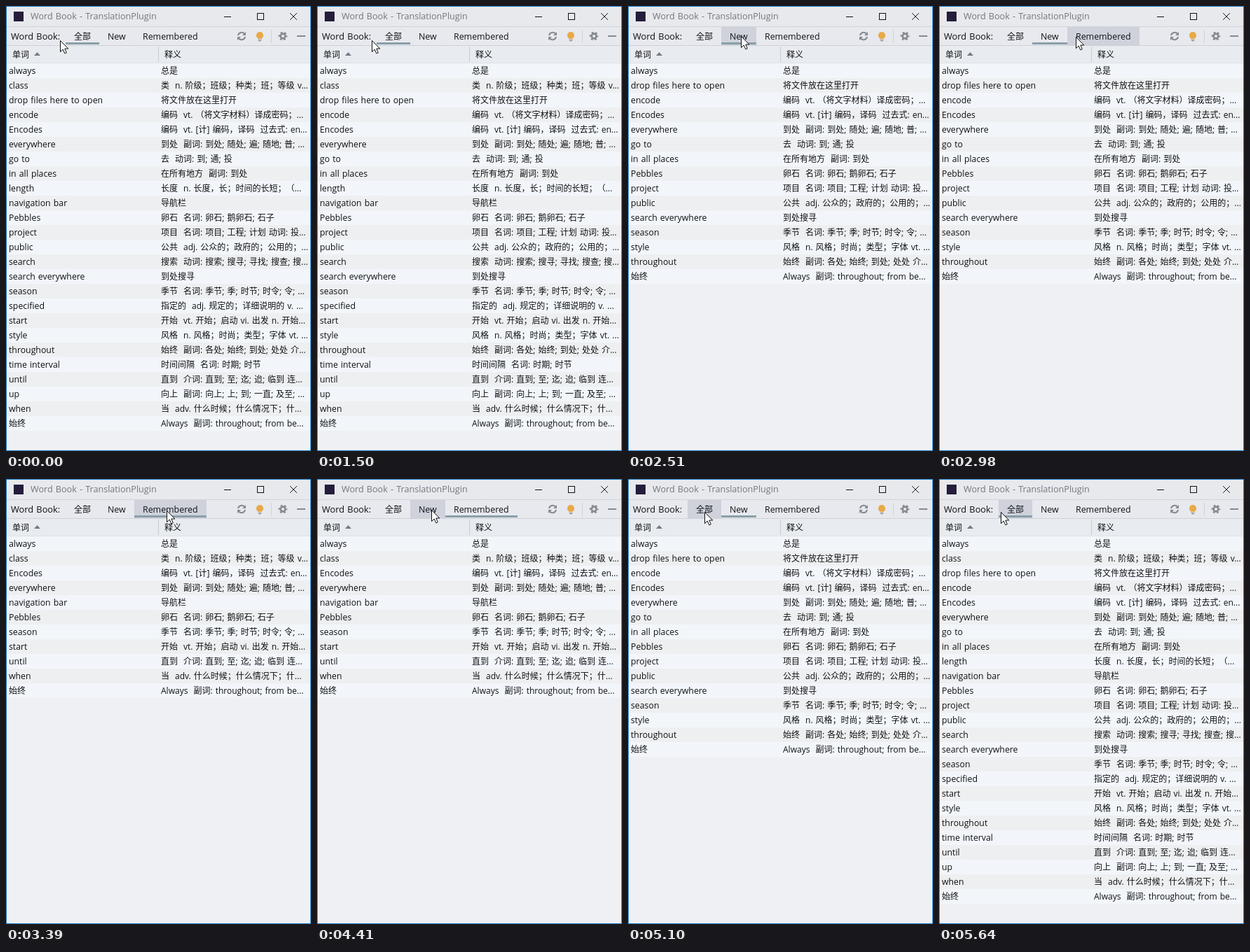
Write an HTML page that moves like this. It is 435 by 636 pixels and loops after 5710 ms.

```html
<!DOCTYPE html>
<html lang="zh-CN">
<head>
<meta charset="utf-8">
<title>Word Book</title>
<style>
html, body { margin: 0; width: 100%; height: 100%; overflow: hidden; }
body {
  position: relative; background: #eef0f3; color: #101114;
  font: 12px "Open Sans", "Noto Sans CJK SC", "Noto Sans CJK JP", sans-serif;
  word-spacing: .9px; white-space: pre; text-spacing-trim: space-all; cursor: default;
}
.bar, .bar span, .tab, #list, #list b, #list i, #frame, svg { position: absolute; }
.bar { left: 0; width: 435px; }
#title { top: 0; height: 29px; line-height: 30px; background: #e7e9ed; border-bottom: 1px solid #d0d3d8; }
#title span { left: 35px; font-size: 12.6px; color: #74777c; }
#tools { top: 30px; height: 26px; line-height: 27px; background: #e7e9ee; border-bottom: 1px solid #cdd1d6; }
#tools > span { left: 7px; font-size: 12.8px; }
.tab { top: 0; height: 26px; text-indent: 12px; font-size: 12.4px; }
.tab:first-of-type { font-size: 12px; }
.tab.hover { background: #cfd2db; }
.tab.on::after {
  content: ""; position: absolute; left: 0; right: 0; bottom: 1px; height: 3px; background: #8a9faa;
}
#head { top: 57px; height: 24px; line-height: 25px; background: #e8ebef; border-bottom: 1px solid #dfe2e6; }
#list { top: 82px; left: 0; width: 435px; }
#list div { position: relative; height: 21px; line-height: 21px; background: #eeeff1; }
#list div:nth-child(odd) { background: #f2f6fa; }
#list b { left: 4px; font-weight: 400; font-size: 12.3px; }
#list b.cjk { font-size: 12px; }
#list i { left: 221px; font-style: normal; }
svg { left: 0; top: 0; }
#frame { inset: 0; border: 1px solid #1878c4; }
</style>
</head>
<body>
<div class="bar" id="title"><span>Word Book - TranslationPlugin</span></div>
<div class="bar" id="tools"><span>Word Book:</span><div class="tab" style="left:85px;width:48px">全部</div><div class="tab" style="left:133px;width:50px">New</div><div class="tab" style="left:183px;width:103px">Remembered</div></div>
<div class="bar" id="head"><span style="left:9px">单词</span><span style="left:226px">释义</span></div>
<div id="list"></div>
<svg width="435" height="636" fill="none">
  <rect x="11" y="8" width="14" height="14" fill="#251d3b"/>
  <g stroke="#111" stroke-linecap="square">
    <path d="M311.500 15.500H320.500"/>
    <rect x="358.500" y="10.500" width="9" height="9"/>
    <path d="M405.500 10.500L414.500 19.500M414.500 10.500L405.500 19.500"/>
  </g>
  <path d="M44.500 66L49 71H40Z" fill="#7a7886"/>
  <path d="M217.500 58V80" stroke="#c9cdd2"/>
  <path d="M378.500 34V53" stroke="#cfd2d7"/>
  <g stroke="#858a90" stroke-width="2">
    <path d="M331 42A5.200 5.200 0 0 1 340 39.500M341 44A5.200 5.200 0 0 1 332 46.500"/>
    <path d="M415 43H427"/>
    <circle cx="395" cy="43" r="3.400" stroke-width="2.600"/>
    <circle cx="395" cy="43" r="5.400" stroke-dasharray="2.827 2.827" stroke-dashoffset="1.414"/>
  </g>
  <path d="M342 37V42H337ZM330 49V44H335Z" fill="#858a90"/>
  <path d="M362 37A5 5 0 0 1 365 46V47H359V46A5 5 0 0 1 362 37Z" fill="#e9a947"/>
  <path d="M359.500 48.500H364.500M360.500 50H363.500" stroke="#8b8577"/>
  <path id="mouse" d="M.5 .5V16.500L4.200 13L6.800 18.800L9.300 17.700L6.800 12H11.800Z" fill="#fff" stroke="#111"/>
</svg>
<div id="frame"></div>
<script>
// word | meaning | lists it belongs to (n: new, r: remembered)
const words = `always|总是|nr
class|类  n. 阶级；班级；种类；班；等级 v...|r
drop files here to open|将文件放在这里打开|n
encode|编码  vt. （将文字材料）译成密码；...|n
Encodes|编码  vt. [计] 编码，译码  过去式: en...|nr
everywhere|到处  副词: 到处; 随处; 遍; 随地; 普; ...|nr
go to|去  动词: 到; 通; 投|n
in all places|在所有地方  副词: 到处|n
length|长度  n. 长度，长；时间的长短；（...|
navigation bar|导航栏|r
Pebbles|卵石  名词: 卵石; 鹅卵石; 石子|nr
project|项目  名词: 项目; 工程; 计划 动词: 投...|n
public|公共  adj. 公众的；政府的；公用的；...|n
search|搜索  动词: 搜索; 搜寻; 寻找; 搜查; 搜...|
search everywhere|到处搜寻|n
season|季节  名词: 季节; 季; 时节; 时令; 令; ...|nr
specified|指定的  adj. 规定的；详细说明的 v. ...|
start|开始  vt. 开始；启动 vi. 出发 n. 开始...|r
style|风格  n. 风格；时尚；类型；字体 vt. ...|n
throughout|始终  副词: 各处; 始终; 到处; 处处 介...|n
time interval|时间间隔  名词: 时期; 时节|
until|直到  介词: 直到; 至; 迄; 迨; 临到 连...|r
up|向上  副词: 向上; 上; 到; 一直; 及至; ...|
when|当  adv. 什么时候；什么情况下；什...|r
始终|Always  副词: throughout; from be...|nr`.split("\n").map(line => line.split("|"));

const LOOP = 5710, STEP = 70;
const filters = ["", "n", "r"];
const edges = [85, 133, 183, 286];
const clicks = [[0, 0], [2510, 1], [3390, 2], [4480, 1], [5230, 0]];
// start time, steps, end point, easing power
const moves = [
  [1500, 5, 110, 51, 2],
  [2040, 4, 161, 43, 1],
  [2770, 8, 229, 45, 1],
  [3920, 8, 163, 44, 1],
  [4680, 7, 109, 47, 1],
  [5430, 4, 88, 47, 1]
];

const list = document.getElementById("list");
const mouse = document.getElementById("mouse");
const tabs = document.querySelectorAll(".tab");
let shown = -1;

function mouseAt(t) {
  let x = 77, y = 49;
  for (const [start, steps, toX, toY, power] of moves) {
    if (t < start) break;
    const done = Math.min(steps, Math.floor((t - start) / STEP) + 1);
    const k = (done / steps) ** power;
    x += (toX - x) * k;
    y += (toY - y) * k;
  }
  return [Math.round(x), Math.round(y)];
}

function showList(tab) {
  if (tab === shown) return;
  shown = tab;
  list.innerHTML = words
    .filter(([, , flags]) => flags.includes(filters[tab]))
    .map(([word, text]) =>
      `<div><b${word > "z~" ? ' class="cjk"' : ""}>${word}</b><i>${text}</i></div>`)
    .join("");
}

function draw() {
  const t = performance.now() % LOOP;
  const [x, y] = mouseAt(t);
  const active = clicks.filter(([at]) => at <= t).pop()[1];
  mouse.setAttribute("transform", `translate(${x} ${y})`);
  tabs.forEach((tab, i) => {
    tab.classList.toggle("on", i === active);
    tab.classList.toggle("hover", x >= edges[i] && x < edges[i + 1]);
  });
  showList(active);
  requestAnimationFrame(draw);
}
draw();
</script>
</body>
</html>
```
